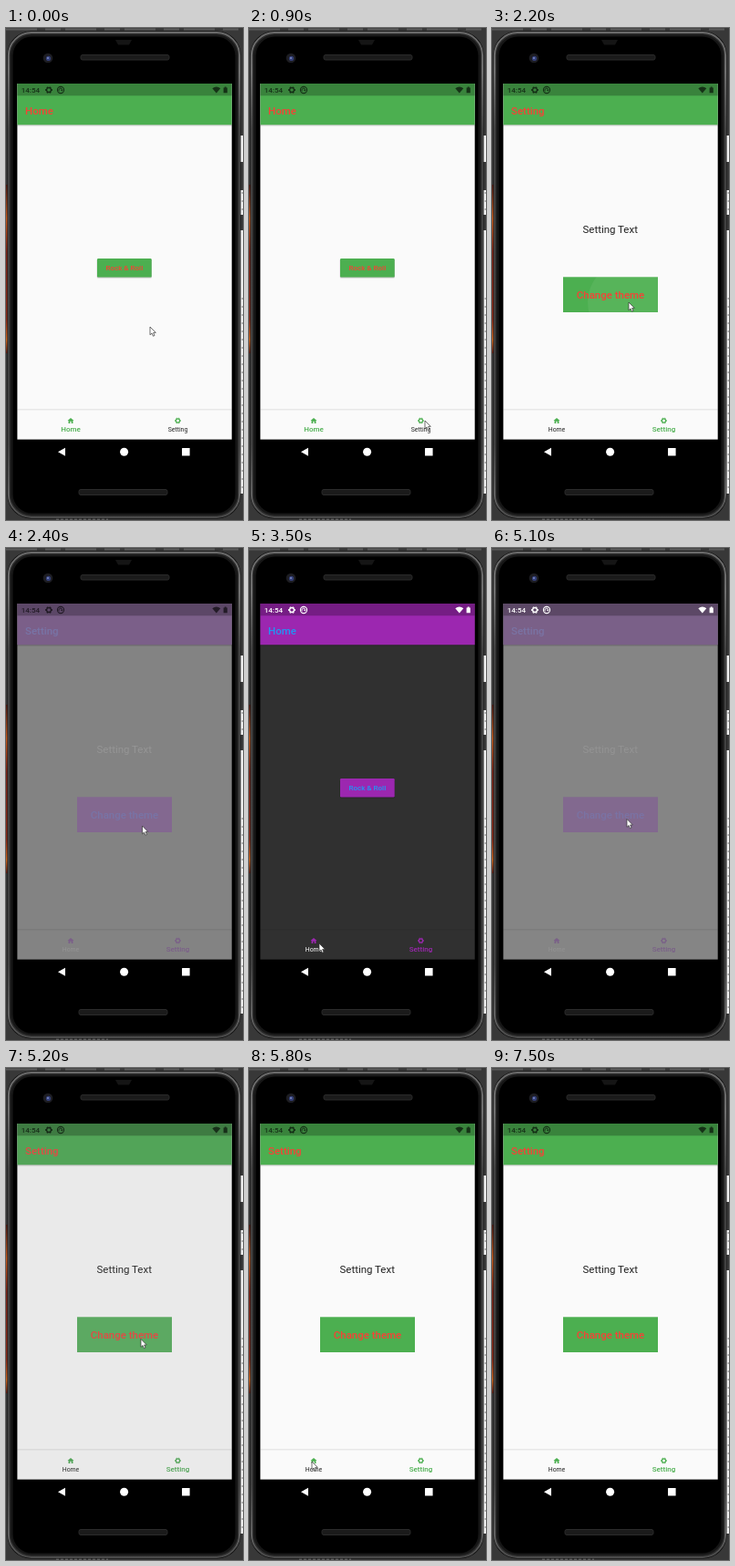
Write an HTML page that moves like this. It is 260 px wide and 540 px high and loops after 7800 ms.

```html
<!DOCTYPE html>
<html lang="en">
<head>
<meta charset="utf-8">
<title>Theme switch demo</title>
<style>
  html, body { margin: 0; width: 100%; height: 100%; overflow: hidden; background: #1b1b1b; }
  svg { display: block; width: 260px; height: 540px; }
  text { font-family: Roboto, "Open Sans", sans-serif; }
  .primary { fill: var(--primary); }
  .accent { fill: var(--accent); }
  .page { fill: var(--page); }
  .ink { fill: var(--ink); }
  .big { font-size: 11.48px; }
  .medium { font-weight: 500; }
  .mid { text-anchor: middle; }
  .gear { fill: none; stroke: currentColor; }
  .nav { color: var(--primary); }
  .slot { fill: #1b1b1b; stroke: #2b2b2b; }
  #status { color: var(--status); fill: currentColor; }
</style>
</head>
<body>
<svg id="stage" viewBox="0 0 260 540">
  <defs>
    <linearGradient id="shine" x1="0" y1="0" x2="0" y2="1">
      <stop offset="0" stop-color="#6a6a6a"/>
      <stop offset=".08" stop-color="#7a7a7a"/>
      <stop offset=".2" stop-color="#444"/>
      <stop offset=".85" stop-color="#444"/>
      <stop offset=".95" stop-color="#686868"/>
      <stop offset="1" stop-color="#4a4a4a"/>
    </linearGradient>
    <linearGradient id="embers" x1="0" y1="0" x2="0" y2="1">
      <stop offset="0" stop-color="#4a1a14"/>
      <stop offset=".2" stop-color="#c25a1e"/>
      <stop offset=".4" stop-color="#7a2418"/>
      <stop offset=".8" stop-color="#8a2c1a"/>
      <stop offset=".92" stop-color="#c8641e"/>
      <stop offset="1" stop-color="#5a1e16"/>
    </linearGradient>
    <linearGradient id="drop" x1="0" y1="0" x2="0" y2="1">
      <stop offset="0" stop-opacity=".2"/>
      <stop offset="1" stop-opacity="0"/>
    </linearGradient>
    <clipPath id="buttonClip"><rect x="78" y="273.3" width="104" height="38.7"/></clipPath>
    <g id="gear" class="gear">
      <circle r="2.1" stroke-width="1.3"/>
      <circle r="2.95" stroke-width="1" pathLength="12" stroke-dasharray="1" stroke-dashoffset=".5"/>
    </g>
  </defs>

  <!-- desktop behind the phone -->
  <rect width="260" height="540" fill="#383838"/>
  <path d="M0 1.5H260" stroke="#5a5a5a" stroke-width="2" stroke-dasharray="34 9 17 5"/>
  <rect y="172" width="4" height="185" fill="url(#embers)"/>
  <path d="M258 118V147M258 178V205M258 222V511" stroke="#f2f2f2" stroke-width="4"/>
  <path d="M259.2 180V204M259.2 296V505" stroke="#888" stroke-dasharray="2 7"/>
  <path d="M55 539H112" stroke="#888" stroke-dasharray="3 2"/>

  <!-- phone body -->
  <rect x="1.5" y="3.5" width="256" height="535" rx="26" fill="#0c0c0c"/>
  <rect x="2.8" y="5" width="253.4" height="532" rx="25" fill="#2a2a2a" stroke="url(#shine)" stroke-width="1.8"/>
  <rect x="5" y="7.5" width="249" height="527" rx="23" fill="#161616"/>
  <rect x="7.5" y="9.5" width="244" height="523" rx="21" fill="#000"/>
  <path d="M120 13H138L135 18.5H123Z" fill="#151515"/>
  <circle cx="46" cy="33" r="5.3" fill="#1d1d22"/>
  <circle cx="46.5" cy="33.4" r="2.6" fill="#333f78"/>
  <circle cx="46" cy="33" r="1" fill="#7f8cc4"/>
  <rect class="slot" x="82" y="29.5" width="97" height="5.5" rx="2"/>
  <rect class="slot" x="80" y="506.5" width="97" height="6" rx="2"/>

  <!-- screen -->
  <rect class="page" x="12.4" y="61" width="235.3" height="390.6"/>
  <rect class="primary" x="12.4" y="61" width="235.3" height="45.3"/>
  <rect x="12.4" y="61" width="235.3" height="13.3" opacity=".25"/>
  <rect x="12.4" y="106.3" width="235.3" height="2" fill="url(#drop)"/>
  <g id="status">
    <text class="medium" x="16.7" y="71" font-size="8">14:54</text>
    <use href="#gear" transform="translate(47 68) scale(1.15)"/>
    <g fill="none" stroke="currentColor">
      <circle cx="60" cy="68" r="3.6" stroke-width="1.1"/>
      <path d="M58.3 69.4A2 2 0 1 1 61.7 69L60 67.8"/>
    </g>
    <path d="M226.3 66.3Q230.8 62.8 235.3 66.3L230.8 71.4Z"/>
    <path d="M238.6 65.4H239.8V64.5H241.6V65.4H242.8V71.3H238.6Z"/>
  </g>
  <text id="title" class="accent big medium" x="21" y="95"></text>

  <g id="homePage">
    <rect x="99.7" y="254" width="60.3" height="20.5" rx="1.5" opacity=".22"/>
    <rect class="primary" x="100" y="253" width="59.7" height="20.5" rx="1.2"/>
    <text class="accent medium mid" x="129.8" y="266.2" font-size="8.04">Rock &amp; Roll</text>
  </g>
  <g id="settingPage">
    <text class="ink big mid" x="129.7" y="225">Setting Text</text>
    <rect class="primary" x="78" y="273.3" width="104" height="38.7"/>
    <circle id="ripple" cx="150" cy="301" fill="#fff" opacity=".06" clip-path="url(#buttonClip)"/>
    <text class="accent big medium mid" x="130" y="297">Change theme</text>
  </g>

  <rect x="12.4" y="418" width="235.3" height="1.5" opacity=".07"/>
  <g class="nav">
    <path fill="currentColor" transform="translate(66.8 426.9) scale(.35)" d="M10 20v-6h4v6h5v-8h3L12 3 2 12h3v8z"/>
    <use href="#gear" x="188.5" y="431"/>
    <text id="homeTab" class="mid" x="71" y="442.6">Home</text>
    <text id="settingTab" class="mid" x="188.5" y="442.6">Setting</text>
  </g>

  <!-- system keys -->
  <g fill="#fff">
    <path d="M57 465.3L65 460.8V469.8Z"/>
    <circle cx="129.6" cy="465.3" r="4.5"/>
    <rect x="193" y="461" width="8.6" height="8.6" rx=".5"/>
  </g>

  <path id="cursor" d="M0 0V8.8L2 7L3.4 10.2L5 9.5L3.6 6.4H6.3Z" fill="#fff" stroke="#333" stroke-width=".7"/>
</svg>
<script>
  const LOOP = 7800, STEP = 100;
  const $ = id => document.getElementById(id);
  const stage = $('stage');
  const clamp = v => Math.min(1, Math.max(0, v));
  const mix = (a, b, k) => a + (b - a) * k;
  const blend = (a, b, k) => a.map((v, i) => mix(v, b[i], k));
  const css = c => `rgba(${c})`;

  // light and dark value of each colour
  const theme = {
    primary: [[76, 175, 80, 1], [156, 39, 176, 1]],
    accent: [[244, 67, 54, 1], [33, 150, 243, 1]],
    page: [[250, 250, 250, 1], [48, 48, 48, 1]],
    ink: [[0, 0, 0, .87], [255, 255, 255, 1]]
  };

  // taps on the bottom bar: time, whether Setting opens
  const taps = [[-1000, 0], [1400, 1], [3500, 0], [4200, 1], [6100, 0], [7100, 1]];

  // pointer: time, x, y
  const route = [
    [300, 158, 328], [600, 176, 378], [900, 193, 431], [1400, 192, 432],
    [1700, 177, 372], [2100, 150, 301], [2200, 150, 301], [2400, 149.5, 305],
    [2500, 146, 312], [2900, 75, 432], [3000, 71, 431], [3300, 77, 434],
    [3500, 77, 434], [3800, 190, 439], [4000, 194, 433], [4200, 194, 433],
    [4700, 148, 297.5], [5200, 148, 297.5], [5600, 69, 432], [6100, 69, 432],
    [6400, 165, 440], [6600, 188, 429], [6800, 194, 429], [7100, 194, 430],
    [7400, 218, 460]
  ];

  function pointerAt(t) {
    const i = route.findIndex(p => p[0] >= t);
    if (i < 0) return route[route.length - 1].slice(1);
    if (i === 0) return route[0].slice(1);
    const a = route[i - 1], b = route[i];
    const k = (t - a[0]) / (b[0] - a[0]);
    return [mix(a[1], b[1], k), mix(a[2], b[2], k)];
  }

  function styleTab(tab, k, colours) {
    tab.style.fill = css(blend(colours.ink, colours.primary, k));
    tab.style.fontSize = mix(6.9, 8.04, k) + 'px';
    tab.style.fontWeight = k > .5 ? 500 : 400;
  }

  function draw(t) {
    const dark = clamp((t - 2282) / 200) - clamp((t - 5016) / 200);
    const colours = {};
    for (const name in theme) {
      colours[name] = blend(...theme[name], dark);
      stage.style.setProperty('--' + name, css(colours[name]));
    }
    const whiteStatus = t >= 2500 && t < 5200;
    stage.style.setProperty('--status', whiteStatus ? '#fff' : 'rgba(0,0,0,.62)');

    const [since, open] = taps.filter(p => p[0] <= t).pop();
    const moved = clamp((t - since) / 200);
    const active = open ? moved : 1 - moved;
    $('title').textContent = open ? 'Setting' : 'Home';
    $('homePage').style.display = open ? 'none' : '';
    $('settingPage').style.display = open ? '' : 'none';
    styleTab($('homeTab'), 1 - active, colours);
    styleTab($('settingTab'), active, colours);

    const press = t < 4000 ? t - 2100 : t - 4900;
    $('ripple').setAttribute('r', press > 0 && press < 450 ? press * .45 : 0);

    const [x, y] = pointerAt(t);
    $('cursor').setAttribute('transform', `translate(${x} ${y})`);
    $('cursor').style.display = t >= 7500 ? 'none' : '';
  }

  const start = performance.now();
  function tick() {
    const t = (performance.now() - start) % LOOP;
    draw(Math.floor(t / STEP) * STEP);
    requestAnimationFrame(tick);
  }
  tick();
</script>
</body>
</html>
```
